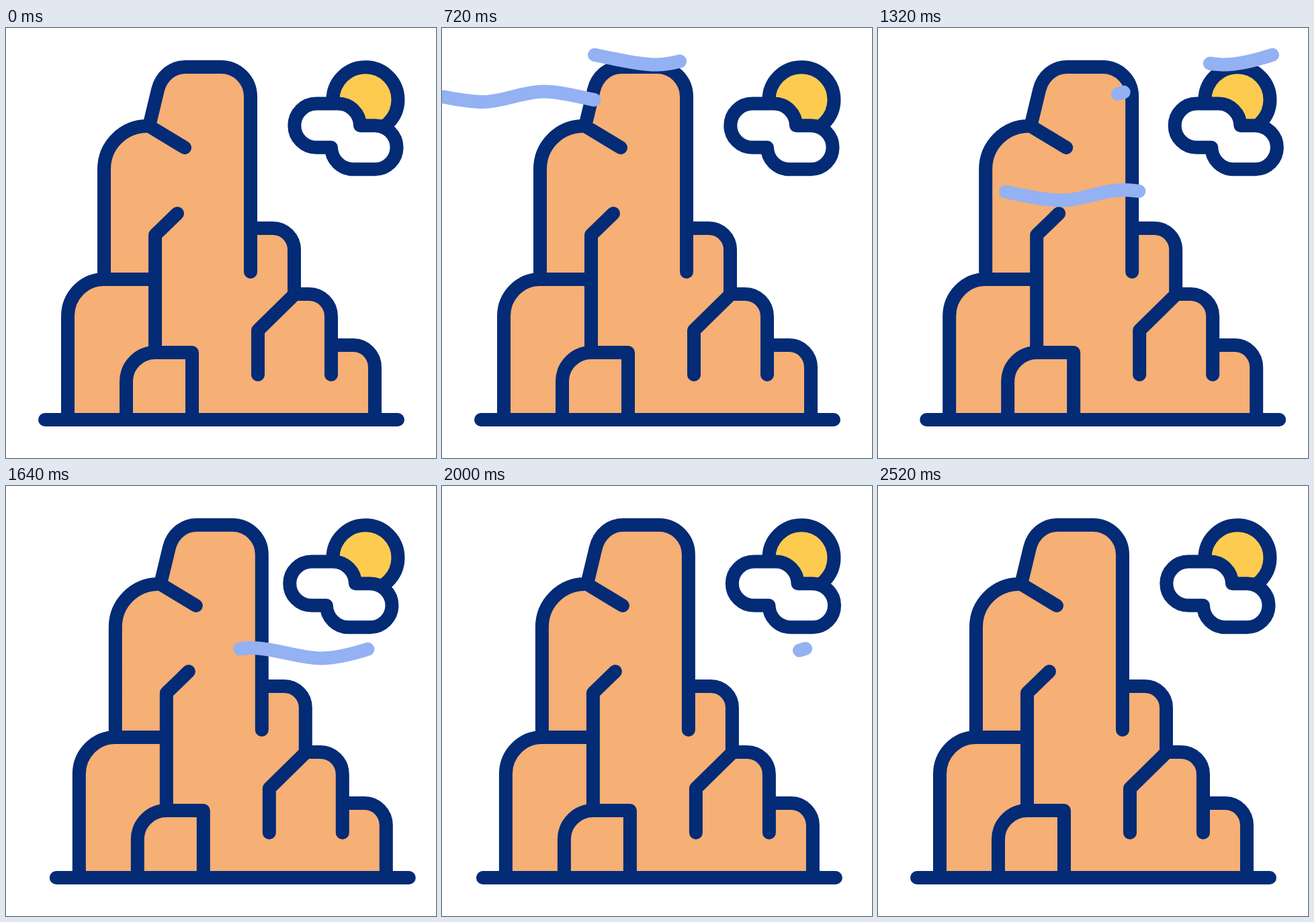
These frames come from a looping animation (640x640 px, 3200 ms). An HTML page:

```html
<!DOCTYPE html>
<html lang="en">
<head>
<meta charset="utf-8">
<title>Windy rock</title>
<style>
html, body { margin: 0; width: 100%; height: 100%; overflow: hidden; background: #fff; }
svg { display: block; width: 100vw; height: 100vh; }
.line { fill: none; stroke: #032b76; stroke-width: 20; stroke-linecap: round; stroke-linejoin: round; }
.wind { fill: none; stroke: #93b1f3; stroke-width: 20; stroke-linecap: round; }
</style>
</head>
<body>
<svg viewBox="0 0 640 640">
  <circle class="line" cx="535" cy="106.8" r="48.5" style="fill:#fdcb50"/>
  <path id="cloud" class="line" style="fill:#fff" d="M462 112.5H494A33 33 0 0 1 527 145.2H549A32.5 32.5 0 0 1 549 210.3H517A33 33 0 0 1 484 177.8H462A32.6 32.6 0 0 1 462 112.5Z"/>
  <g id="rock">
    <path fill="#f6af75" d="M92 583V429A54 54 0 0 1 146 374V210A64 64 0 0 1 210 146H213L226 92C231 72 247 58 267 58H320A44 44 0 0 1 364 102V298H397A32 32 0 0 1 429 330V396H451A33 33 0 0 1 484 429V472H517A32 33 0 0 1 549 505V583Z"/>
    <path class="line" d="M58 583H583
      M266 178L213 146L226 92C231 72 247 58 267 58H320A44 44 0 0 1 364 102V363
      M213 146H210A64 64 0 0 0 146 210V374
      M92 583V429A54 55 0 0 1 146 374H222
      M255 276L222 308V483
      M179 583V526A43 43 0 0 1 222 483H277V583
      M364 298H397A32 32 0 0 1 429 330V396
      M375 516V450L430 396H451A33 33 0 0 1 484 429V516
      M484 472H517A32 33 0 0 1 549 505V583"/>
  </g>
</svg>
<script>
const LOOP = 3200, STEP = 40;
const svg = document.querySelector('svg');
const rock = document.getElementById('rock');
const cloud = document.getElementById('cloud');

const ease = (t, start, span) => {
  const v = Math.min(1, Math.max(0, (t - start) / span));
  return v * v * (3 - 2 * v);
};

// Eased travel through evenly spaced stops
const swing = (t, start, span, stops) =>
  stops.reduce((x, stop, i) => x + (stop - (stops[i - 1] || 0)) * ease(t, start + i * span, span), 0);

const shift = (el, x, y = 0) => el.setAttribute('transform', `translate(${x} ${y})`);

const gusts = [
  { x: 227, y: 40, start: 400, drift: 0 },
  { x: -12, y: 95.5, start: 200, drift: 0.0635 },
  { x: 181, y: 242, start: 880, drift: 0 }
];

for (const gust of gusts) {
  gust.el = document.createElementNS('http://www.w3.org/2000/svg', 'path');
  gust.el.setAttribute('class', 'wind');
  gust.el.setAttribute('pathLength', 1);
  gust.el.setAttribute('d', 'M0 0C40 8 68 14.5 93 14.5C123 14.5 153-1 184-1C219-1 254 14.5 289 14.5C311 14.5 335 8 360 0');
  svg.append(gust.el);
}

function draw(t) {
  shift(rock, swing(t, 880, 640, [18.5, 0]));
  shift(cloud, swing(t, 880, 320, [25, -15, 10, -5, 0]));
  for (const { el, x, y, start, drift } of gusts) {
    const head = ease(t, start, 800);
    const tail = ease(t, start + 360, 840);
    el.style.display = head > tail ? '' : 'none';
    el.style.strokeDasharray = `${head - tail} 2`;
    el.style.strokeDashoffset = -tail;
    shift(el, x + drift * (t - 1040), y);
  }
}

const origin = performance.now();
function tick() {
  const t = (performance.now() - origin) % LOOP;
  draw(Math.floor(t / STEP) * STEP);
  requestAnimationFrame(tick);
}
tick();
</script>
</body>
</html>
```
